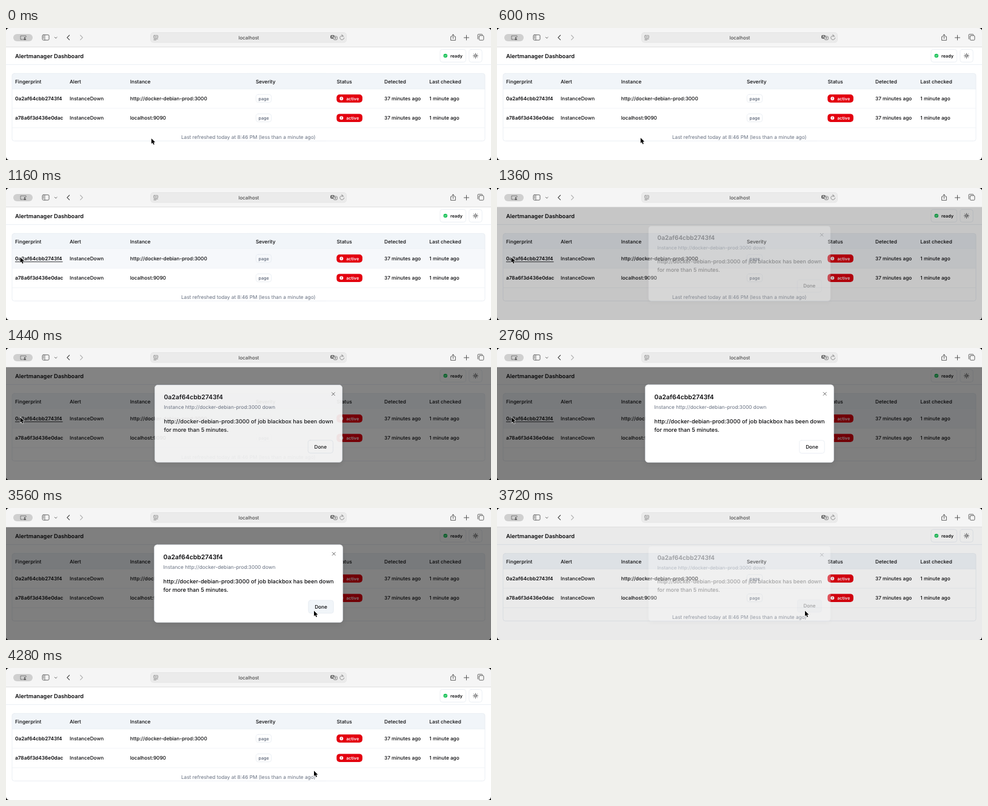
An HTML page with a canvas that plays this animation: 800x219 px, repeating every 4320 ms.

```html
<!DOCTYPE html>
<html lang="en">
<head>
<meta charset="utf-8">
<title>Alertmanager Dashboard</title>
<style>
  html, body { margin: 0; width: 100%; height: 100%; overflow: hidden; background: #000; }
  canvas { display: block; width: 800px; height: 219px; }
</style>
</head>
<body>
<canvas id="stage"></canvas>
<script>
const W = 800, H = 219, LOOP = 4320, STEP = 40;
const OPEN = 1320, CLOSE = 3640, FADE = 200, DIM = 150, LEAVE = 2790;
const INK = '#0a0a0c', MUTED = '#677080', LINE = '#e2e8f0', RED = '#e3000f', ICON = '#555';
const dpr = window.devicePixelRatio || 1;

const stage = document.getElementById('stage');
const layer = document.createElement('canvas');
for (const c of [stage, layer]) {
  c.width = Math.round(W * dpr);
  c.height = Math.round(H * dpr);
}
const screen = stage.getContext('2d');
const panel = layer.getContext('2d');
let g = screen;

const clamp = v => Math.max(0, Math.min(1, v));
const smooth = p => p * p * (3 - 2 * p);
const mix = (a, b, p) => a + (b - a) * p;

// CSS "ease": cubic-bezier(.25, .1, .25, 1)
function ease(x) {
  if (x <= 0 || x >= 1) return clamp(x);
  const curve = (a, b, s) => 3 * a * s * (1 - s) ** 2 + 3 * b * s * s * (1 - s) + s ** 3;
  let lo = 0, hi = 1;
  for (let i = 0; i < 24; i++) {
    const mid = (lo + hi) / 2;
    if (curve(.25, .25, mid) < x) lo = mid; else hi = mid;
  }
  return curve(.1, 1, lo);
}

function text(str, x, y, size = 8.22, weight = 450, color = INK, align = 'left') {
  g.font = `${weight} ${size}px Inter, "Liberation Sans", sans-serif`;
  g.textRendering = 'geometricPrecision';
  g.textAlign = align;
  g.textBaseline = 'alphabetic';
  g.fillStyle = color;
  g.fillText(str, x, y + size * .36);
}

function box(x, y, w, h, r, fill, stroke, lw = .7) {
  g.beginPath();
  g.roundRect(x, y, w, h, r);
  if (fill) { g.fillStyle = fill; g.fill(); }
  if (stroke) { g.strokeStyle = stroke; g.lineWidth = lw; g.stroke(); }
}

function rect(x, y, w, h, fill) {
  g.fillStyle = fill;
  g.fillRect(x, y, w, h);
}

function disc(x, y, r, fill) {
  g.beginPath();
  g.arc(x, y, r, 0, Math.PI * 2);
  g.fillStyle = fill;
  g.fill();
}

function draw(d, color = ICON, lw = .9) {
  g.strokeStyle = color;
  g.lineWidth = lw;
  g.lineCap = g.lineJoin = 'round';
  g.stroke(new Path2D(d));
}

function toolbar() {
  rect(0, 0, W, 32, '#f5f5f5');
  rect(0, 31, W, .8, '#dadada');

  box(12, 10, 32, 12, 6, '#cfcfcf');
  draw('M27.5 19H24V13h9v2', ICON, .7);
  disc(31, 16.4, 1.2, ICON);
  box(28.8, 18, 4.4, 1.8, .9, ICON);

  box(60, 11.3, 11, 8.8, 1.8, null, ICON, .9);
  draw('M64 11.5V20M61.5 13.5h1M61.5 15.3h1M61.5 17h1', ICON, .7);
  draw('M80.3 15.2l1.9 1.9 1.9-1.9');
  draw('M104.6 12l-3.8 3.8 3.8 3.8', '#444', 1.1);
  draw('M122.6 12l3.8 3.8-3.8 3.8', '#b0b0b0', 1.1);

  box(238.5, 7.5, 323, 16.5, 4.5, '#ebebeb', '#e0e0e0', .6);
  box(243.7, 12.3, 6.8, 4.4, .8, null, '#777', .7);
  draw('M245 14.4h4M243.9 18.3h6.4M243.9 20h3.6', '#777', .7);
  text('localhost', 400.5, 16, 7.95, 400, '#333', 'center');

  box(535, 11.8, 7, 6, 2.2, '#666');
  text('A', 538.3, 14.8, 4.6, 600, '#fff', 'center');
  box(540, 13.8, 6.6, 5.8, 2, '#ebebeb', '#666', .7);
  draw('M541.7 15.9h3.2M543.3 15.1v.8M542 18.3l2.4-2.2M542.4 16.6l2.2 1.7', '#666', .55);
  draw('M557 14.2A3.4 3.4 0 1 0 557.6 16.6M553.8 11l2 1.8-1.8 1.8', '#777', .8);

  draw('M735.6 14.2h-2v6.2h7.8v-6.2h-2M737.5 17.5V10.8M735.4 12.8l2.1-2.1 2.1 2.1');
  draw('M759.5 12v8M755.5 16h8', ICON, 1);
  draw('M778.2 18.2V11.4a1 1 0 0 1 1-1h5.6a1 1 0 0 1 1 1v.8', ICON, .9);
  box(780.3, 12.6, 7.6, 7.6, 1.4, '#f5f5f5', ICON, .9);
}

function header() {
  text('Alertmanager Dashboard', 15, 46.3, 9.3, 600);
  box(716, 35.6, 42.6, 21, 3.8, '#fff', LINE);
  disc(724.8, 46, 3.3, '#1fc45c');
  draw('M723.4 46.1l1 1 1.8-2', '#fff', .7);
  text('ready', 733, 46.1, 7.2, 600);
  box(763.8, 35.6, 21.4, 21, 3.8, '#fff', LINE);
  let rays = '';
  for (let i = 0; i < 8; i++) {
    const c = Math.cos(i * Math.PI / 4), s = Math.sin(i * Math.PI / 4);
    rays += `M${774.5 + c * 3} ${46.1 + s * 3}L${774.5 + c * 3.9} ${46.1 + s * 3.9}`;
  }
  draw(rays, INK, .8);
  g.beginPath();
  g.arc(774.5, 46.1, 1.6, 0, Math.PI * 2);
  g.stroke();
  rect(0, 60.4, W, .7, LINE);
}

const columns = [['Fingerprint', 15], ['Alert', 105], ['Instance', 204.7], ['Severity', 412],
  ['Status', 545.5], ['Detected', 624], ['Last checked', 698.3]];
const alerts = [
  { id: '0a2af64cbb2743f4', host: 'http://docker-debian-prod:3000', y: 117, idWidth: 78.5 },
  { id: 'a78a6f3d436e0dac', host: 'localhost:9090', y: 149.2, idWidth: 80.5 }
];

function alertRow({ id, host, y, idWidth }, pointer) {
  const hover = pointer && Math.abs(pointer.y - y) < 16;
  if (hover) rect(10.4, y - 16, 779.2, 32, '#f6f8fb');
  rect(10.4, y + 15.8, 779.2, .6, '#e9eef4');
  text(id, 15, y, 8.25, 600);
  if (hover && Math.abs(pointer.y - y) < 7 && pointer.x < 15 + idWidth) {
    rect(15, y + 5.1, idWidth, .8, INK);
  }
  text('InstanceDown', 105, y);
  text(host, 204.7, y);
  box(412.3, y - 6.7, 25.4, 13.2, 3.8, null, LINE);
  text('page', 416.4, y, 7.1, 600, MUTED);
  box(545.3, y - 6.8, 42.6, 13.6, 5, RED);
  disc(553.3, y, 3, '#fff');
  rect(552.9, y - 1.7, .8, 2, RED);
  rect(552.9, y + .9, .8, .8, RED);
  text('active', 561.3, y, 7.1, 600, '#fff');
  text('37 minutes ago', 624, y);
  text('1 minute ago', 698.3, y);
}

function table(pointer) {
  g.save();
  g.beginPath();
  g.roundRect(10, 75.4, 780, 112, 3.6);
  g.clip();
  rect(10, 75, 780, 26, '#f1f5f9');
  rect(10, 100.8, 780, .6, LINE);
  alerts.forEach(a => alertRow(a, pointer));
  g.restore();
  columns.forEach(([name, x]) => text(name, x, 88.8, 8.25, 500));
  box(10, 75.4, 780, 112, 3.6, null, LINE);
  text('Last refreshed today at 8:46 PM (less than a minute ago)', 399.7, 181, 8.28, 400, MUTED, 'center');
}

function dialog(show, doneHover) {
  const scale = mix(.95, 1, show);
  g = panel;
  g.setTransform(1, 0, 0, 1, 0, 0);
  g.clearRect(0, 0, layer.width, layer.height);
  g.setTransform(dpr, 0, 0, dpr, 0, 0);
  g.translate(400, 125.4);
  g.scale(scale, scale);
  g.translate(-400, -125.4);

  g.shadowColor = 'rgba(0,0,0,.08)';
  g.shadowBlur = 8 * dpr;
  g.shadowOffsetY = 4 * dpr;
  box(244.4, 60.8, 311.2, 129.2, 5, '#fff');
  g.shadowColor = 'transparent';
  box(244.7, 61.1, 310.6, 128.6, 4.7, null, LINE, .6);

  text('0a2af64cbb2743f4', 259.6, 81.3, 10.45, 600);
  text('Instance http://docker-debian-prod:3000 down', 259.6, 98, 8.25, 400, MUTED);
  text('http://docker-debian-prod:3000 of job blackbox has been down', 259.6, 121.2, 9.2);
  text('for more than 5 minutes.', 259.6, 135.8, 9.2);
  draw('M538.2 73.5l5 5M543.2 73.5l-5 5', '#555', .9);
  box(498.8, 153.2, 41.4, 21.4, 3.8, doneHover ? '#f1f5f9' : '#fff', LINE);
  text('Done', 519.5, 163.8, 8.25, 500, INK, 'center');

  g = screen;
  g.globalAlpha = show;
  g.drawImage(layer, 0, 0, W, H);
  g.globalAlpha = 1;
}

// Cursor waypoints: start, end, target x, target y
const moves = [[560, 1140, 23.5, 115], [2750, 3200, 494, 176], [3200, 3400, 508, 170.6]];

function cursorAt(t) {
  let x = 239.8, y = 183.2;
  for (const [from, to, tx, ty] of moves) {
    const p = smooth(clamp((t - from) / (to - from)));
    x = mix(x, tx, p);
    y = mix(y, ty, p);
  }
  return { x, y };
}

function cursor({ x, y }) {
  g.save();
  g.translate(x, y);
  const arrow = new Path2D('M0 0V8.8L2 7 3.5 10.4 5 9.7 3.6 6.5 6.3 6.3Z');
  g.lineJoin = 'round';
  g.strokeStyle = '#fff';
  g.lineWidth = 1.2;
  g.stroke(arrow);
  g.fillStyle = '#000';
  g.fill(arrow);
  g.restore();
}

// 0 to 1 after opening, back to 0 after closing
function visible(t, duration) {
  return t < CLOSE ? ease((t - OPEN) / duration) : 1 - ease((t - CLOSE) / duration);
}

function render(t) {
  const pos = cursorAt(t);
  const show = visible(t, FADE);
  const blocked = t >= LEAVE && t < CLOSE + FADE;

  g.setTransform(dpr, 0, 0, dpr, 0, 0);
  rect(0, 0, W, H, '#000');
  g.save();
  g.beginPath();
  g.roundRect(0, 0, W, H, 5.5);
  g.clip();
  rect(0, 0, W, H, '#fff');
  header();
  table(blocked ? null : pos);
  if (show > 0) {
    rect(0, 31.5, W, H - 31.5, `rgba(0,0,0,${.5 * visible(t, DIM)})`);
    const onDone = pos.x > 498.8 && pos.x < 540.2 && pos.y > 153 && pos.y < 175;
    dialog(show, onDone);
  }
  toolbar();
  g.restore();
  cursor(pos);
}

const begin = performance.now();
function tick() {
  const t = (performance.now() - begin) % LOOP;
  render(Math.floor(t / STEP) * STEP);
  requestAnimationFrame(tick);
}
tick();
</script>
</body>
</html>
```
